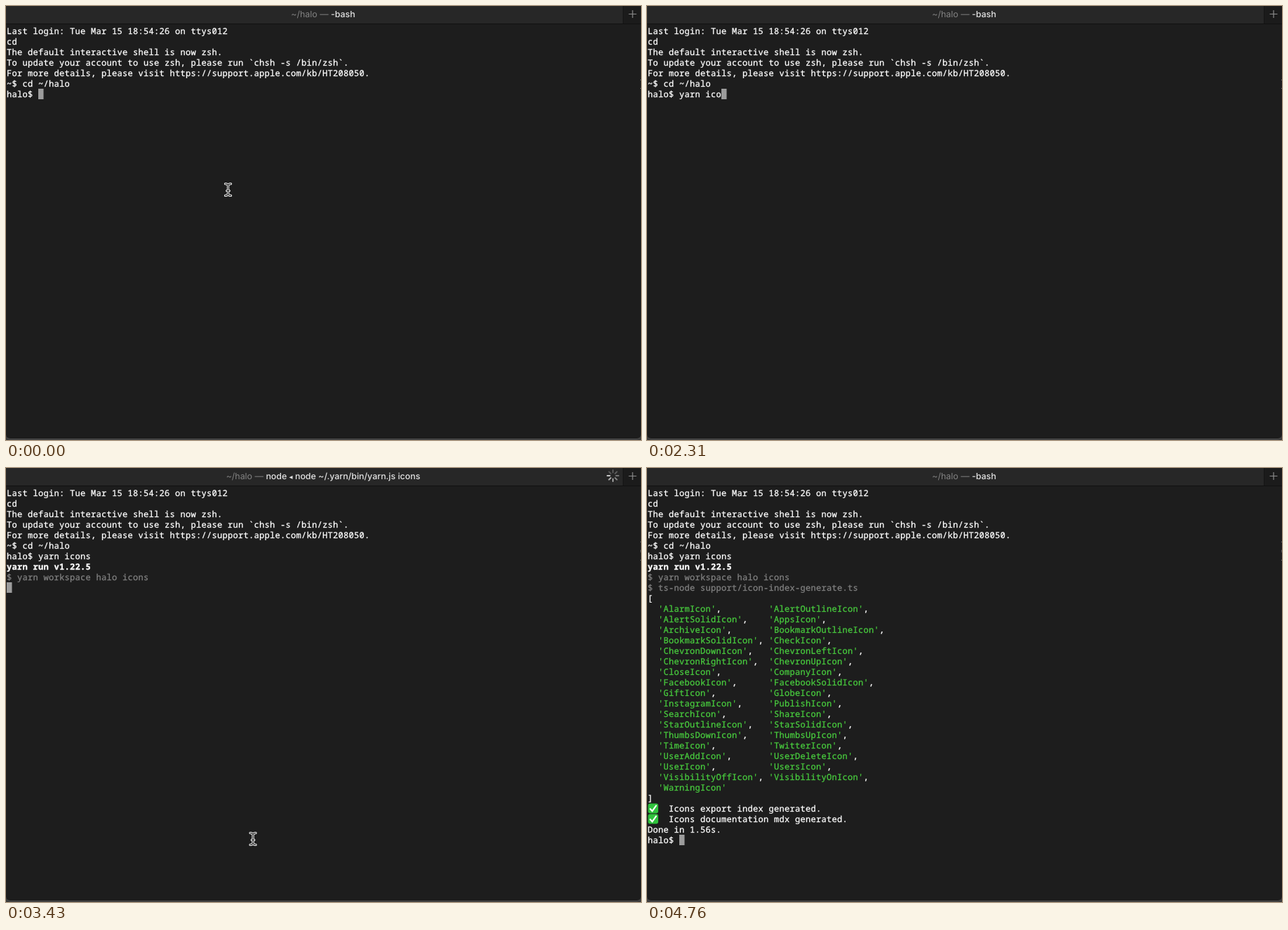
These frames come from a looping animation (905 px wide and 619 px high, 6300 ms). An HTML page:

```html
<!DOCTYPE html>
<html lang="en">
<head>
<meta charset="utf-8">
<title>Terminal</title>
<style>
  html, body { margin: 0; width: 100%; height: 100%; overflow: hidden; background: #1d1d1d; }
  #stage { position: relative; width: 905px; height: 619px; overflow: hidden; background: #3a3a3a; text-rendering: geometricPrecision; }
  #window { position: absolute; inset: 0 0 1px; box-sizing: border-box; background: #1d1d1d; border-bottom: 1px solid #505050; border-radius: 0 0 6px 6px; }
  #bar { position: absolute; left: 0; top: 0; width: 905px; height: 25px; background: #272727; border-bottom: 1px solid #111; }
  #tab { position: absolute; left: 879px; top: 0; width: 25px; height: 25px; background: #1b1b1b; border-left: 1px solid #151515; }
  #title { position: absolute; left: 0; top: 0; width: 904px; text-align: center; white-space: pre; color: #e4e4e4; font: 500 12.4px/23.5px Inter, sans-serif; }
  #title .path { color: #828282; font-weight: 400; }
  #title .tri { font: 10px/0 "DejaVu Sans", sans-serif; }
  .row { position: absolute; left: 1px; height: 15px; white-space: pre; color: #fff; font: 500 12px/15px "Noto Sans Mono", monospace; letter-spacing: .3px; -webkit-text-stroke: .3px; }
  .bold { font-weight: 700; }
  .dim { color: #808080; }
  .green { color: #48cb3e; }
  .mark { position: absolute; left: 904px; width: 1px; height: 11px; border: solid #777; border-width: 1px 0; }
  .check { position: absolute; left: 0; top: 0; }
  #overlay { position: absolute; left: 0; top: 0; }
</style>
</head>
<body>
<div id="stage">
  <div id="window"></div>
  <div id="bar"></div>
  <div id="tab"></div>
  <div id="title"></div>
  <div id="rows"></div>
  <svg id="overlay" width="905" height="619" fill="none">
    <defs>
      <path id="beam" d="M-4-8.4C-1.4-8.4 0-7.6 0-5.6V5.6C0 7.6-1.4 8.4-4 8.4M4-8.4C1.4-8.4 0-7.6 0-5.6M0 5.6C0 7.6 1.4 8.4 4 8.4M-1.8 1.5H1.8"/>
    </defs>
    <rect id="block" width="7.5" height="15" fill="#9c9c9c"/>
    <path d="M887.5 11.5h11M893 6v11" stroke="#8c8c8c" stroke-width="1.2"/>
    <g id="spinner" transform="translate(865 11)" stroke="#c8c8c8" stroke-width="2" stroke-linecap="round"></g>
    <g id="mouse" stroke-linecap="round">
      <use href="#beam" stroke="#fff" stroke-width="3.2"/>
      <use href="#beam" stroke="#1a1a1a" stroke-width="1.2"/>
    </g>
  </svg>
</div>
<script>
const LOOP = 6300;
const CELL = 7.5, LINE = 15, LEFT = 1, TOP = 28;
const $ = id => document.getElementById(id);

const command = 'yarn icons';
const keyTimes = [980, 1120, 1260, 1400, 1610, 1960, 2100, 2310, 2380, 2520];
const ENTER = 2870, RUN = 3010, SHELL = 3150, NODE = 3290, GENERATE = 3640, OUTPUT = 4690, DONE = 4760;

const iconNames = ('Alarm AlertOutline AlertSolid Apps Archive BookmarkOutline BookmarkSolid Check ' +
  'ChevronDown ChevronLeft ChevronRight ChevronUp Close Company Facebook FacebookSolid Gift Globe ' +
  'Instagram Publish Search Share StarOutline StarSolid ThumbsDown ThumbsUp Time Twitter ' +
  'UserAdd UserDelete User Users VisibilityOff VisibilityOn Warning').split(' ');

const check = `<svg class="check" width="16" height="15">
  <rect x=".5" y=".5" width="14.5" height="14" rx="3" fill="#2fc23c"/>
  <path d="M3.6 8.2 6.5 11.3 12 3.6" fill="none" stroke="#fff" stroke-width="2.1" stroke-linecap="round"/></svg>`;

const rows = [];
function print(time, html, style = '') {
  const el = document.createElement('div');
  el.className = 'row ' + style;
  el.style.top = TOP + rows.length * LINE + 'px';
  el.innerHTML = html;
  $('rows').append(el);
  rows.push({ el, time });
  return el;
}

function printIcons() {
  const quoted = iconNames.map(name => `'${name}Icon'`);
  const cell = i => {
    if (i >= quoted.length) return '';
    const comma = i < quoted.length - 1 ? ',' : '';
    const pad = i % 2 ? '' : ' '.repeat(21 - quoted[i].length - comma.length);
    return `<span class="green">${quoted[i]}</span>${comma}${pad}`;
  };
  print(OUTPUT, '[');
  for (let i = 0; i < quoted.length; i += 2) print(OUTPUT, '  ' + cell(i) + cell(i + 1));
  print(OUTPUT, ']');
}

print(0, 'Last login: Tue Mar 15 18:54:26 on ttys012');
print(0, 'cd');
print(0, 'The default interactive shell is now zsh.');
print(0, 'To update your account to use zsh, please run `chsh -s /bin/zsh`.');
print(0, 'For more details, please visit https://support.apple.com/kb/HT208050.');
print(0, '~$ cd ~/halo');
const prompt = print(0, 'halo$ ');
print(RUN, 'yarn run v1.22.5', 'bold');
print(RUN, '$ yarn workspace halo icons', 'dim');
print(GENERATE, '$ ts-node support/icon-index-generate.ts', 'dim');
printIcons();
print(OUTPUT, check + '    Icons export index generated.');
print(OUTPUT, check + '    Icons documentation mdx generated.');
print(DONE, 'Done in 1.56s.');
print(DONE, 'halo$ ');

const marks = [[0, 105], [ENTER, 119]].map(([time, y]) => {
  const el = document.createElement('div');
  el.className = 'mark';
  el.style.top = y + 'px';
  $('stage').append(el);
  return { el, time };
});

const SPOKES = 8;
for (let i = 0; i < SPOKES; i++) {
  $('spinner').insertAdjacentHTML('beforeend', `<path d="M0-4.4V-8" transform="rotate(${i * 360 / SPOKES})"/>`);
}
const spokes = [...$('spinner').children];

// Latest entry whose time has been reached.
const latest = (steps, t) => steps.filter(step => t >= step[0]).pop();

const yarn = 'node ~/.yarn/bin/yarn.js icons';
const tri = ' <span class="tri">◂</span> ';
const titles = [[0, '-bash'], [RUN, yarn], [SHELL, 'sh' + tri + yarn], [NODE, 'node' + tri + yarn], [DONE, '-bash']];
const blocks = [[ENTER, 0, 7], [RUN, 0, 9], [GENERATE, 0, 10], [OUTPUT, 0, 32], [DONE, 6, 33]];
const mousePath = [[0, 316.5, 262], [1050], [3360, 338, 418], [3430, 352, 529], [3500, 358, 591], [3570]];

const show = (el, on) => { el.style.visibility = on ? 'visible' : 'hidden'; };
let shownTitle;

function draw(t) {
  for (const { el, time } of rows.concat(marks)) show(el, t >= time);

  const typed = keyTimes.filter(time => t >= time).length;
  prompt.textContent = 'halo$ ' + command.slice(0, typed);

  const [, col, row] = latest(blocks, t) || [0, 6 + typed, 6];
  $('block').setAttribute('x', LEFT + col * CELL);
  $('block').setAttribute('y', TOP + row * LINE);

  const title = latest(titles, t)[1];
  if (title !== shownTitle) {
    $('title').innerHTML = `<span class="path">~/halo — </span>${title}`;
    shownTitle = title;
  }

  const [, x, y] = latest(mousePath, t);
  show($('mouse'), x !== undefined);
  if (x !== undefined) $('mouse').setAttribute('transform', `translate(${x} ${y})`);

  show($('spinner'), t >= NODE && t < DONE);
  const head = Math.floor((t - 3430) / 120) + 6;
  spokes.forEach((spoke, i) => {
    const age = ((head - i) % SPOKES + SPOKES) % SPOKES;
    spoke.style.opacity = Math.max(.3, 1 - age * .13);
  });
}

let start;
function tick(now) {
  start ??= now;
  draw((now - start) % LOOP);
  requestAnimationFrame(tick);
}
draw(0);
requestAnimationFrame(tick);
</script>
</body>
</html>
```
